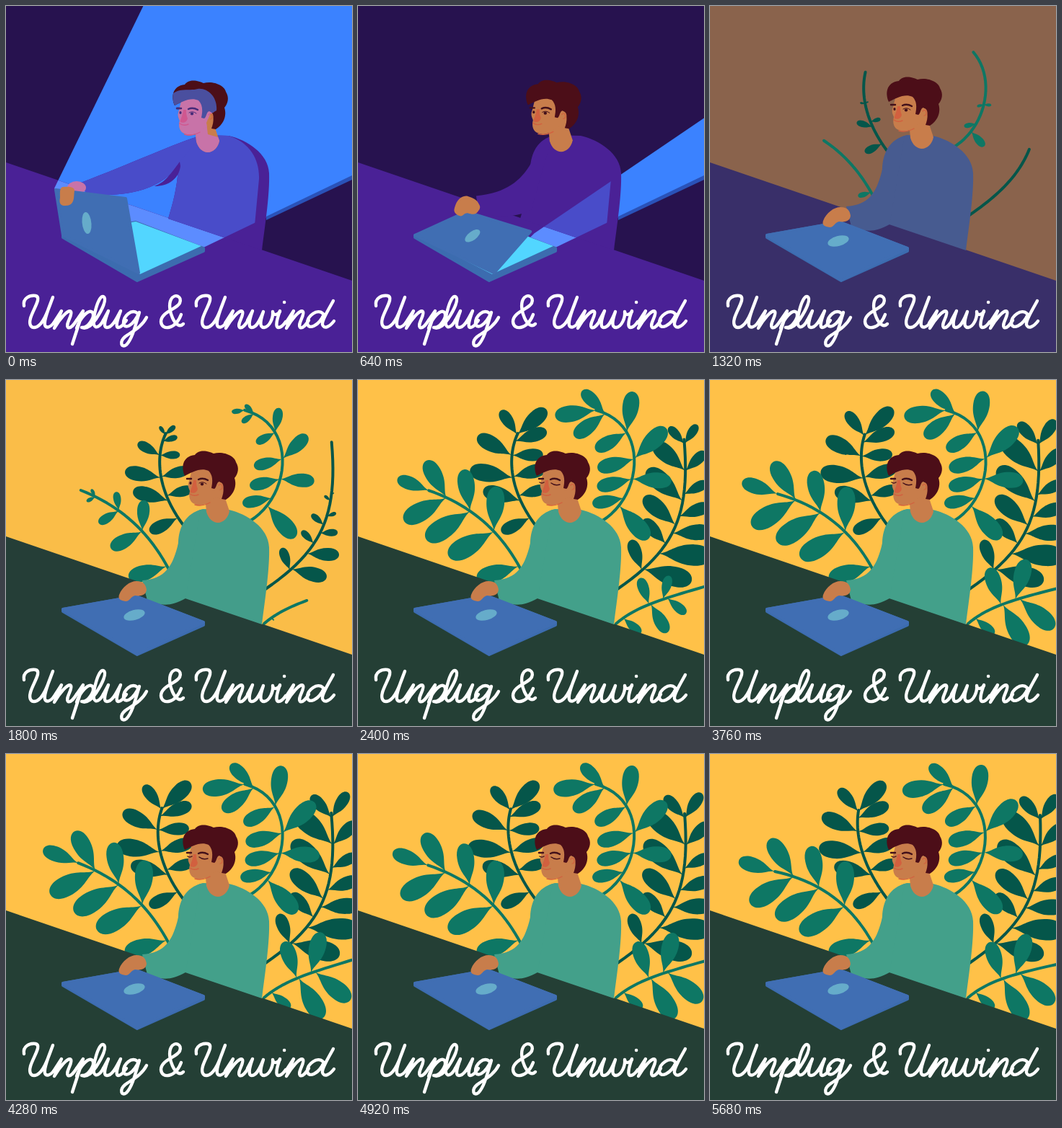
Recreate the animation shown at these times as an HTML page. Size 480 by 480 pixels, loop 5760 ms.

```html
<!DOCTYPE html>
<html lang="en">
<head>
<meta charset="utf-8">
<title>Unplug &amp; Unwind</title>
<style>
html, body { margin: 0; width: 100%; height: 100%; overflow: hidden; }
svg { display: block; width: 100%; height: 100%; }
.line { fill: none; stroke-linecap: round; stroke-linejoin: round; }
</style>
</head>
<body>
<svg id="stage" viewBox="0 0 480 480" xmlns="http://www.w3.org/2000/svg"></svg>
<script>
const LOOP = 5760;
const stage = document.getElementById('stage');
const TORSO = 'M273 179C248 185 240 205 239 225C237 255 231 275 225 295L355 339C360 300 366 260 365 232C364 205 335 186 309 180Z';
const TABLE = 'M0 217L480 381V480H0Z';

const head = (skin, hair, blush, ink) => `
  <path fill="${skin}" d="M276 160L278 183C284 204 306 202 310 182L302 158Z"/>
  <path fill="${skin}" d="M258 124L254 140C251 147 254 151 255 154C253 162 255 170 262 172C270 176 280 172 287 165L303 160V140L290 120Z"/>
  <path fill="${blush}" d="M260 139C259 148 255 153 256 156C260 158 265 156 266 151C264 147 264 142 264 139Z"/>
  <path class="line" stroke="${blush}" stroke-width="1.4" d="M255 158Q260 162 267 159M262 173Q272 176 283 170"/>
  <path fill="${hair}" d="M248 133C243 122 244 106 262 104C268 95 282 99 288 102C302 98 318 106 319 114C324 122 322 130 317 136C321 148 315 160 305 166L299 165C303 155 303 144 296 141C292 141 292 150 289 151L285 150C287 140 287 132 281 126C270 121 258 128 248 133Z"/>
  <ellipse cx="297" cy="148" rx="4.5" ry="6" fill="${skin}"/>
  <path class="line" stroke="${blush}" stroke-width="1.2" d="M295 146Q299 142 300 148Q300 152 297 152"/>
  <path class="line" stroke="${ink}" stroke-width="2.4" d="M251 137L257 137M267 138Q273 135 280 139"/>
  <g class="open" fill="${ink}"><ellipse cx="256" cy="143" rx="1.6" ry="2"/><ellipse cx="272" cy="144.5" rx="2.2" ry="2"/>
    <path class="line" stroke="${ink}" d="M268 143Q273 140 278 144"/></g>
  <path class="line shut" stroke="${ink}" stroke-width="1.5" d="M252 142Q255 144 258 142M268 143Q273 147 280 145"/>`;

const U = 'M25 416C23 405 33 401 41 402C50 404 38 420 34 433C31 444 36 448 43 445C53 440 59 420 65 404C59 420 52 436 54 443C56 448 62 445 66 440';
const N = 'M66 440L77 423L67 447C74 435 86 420 90 424C93 428 82 441 86 446C90 448 94 442 98 436';
const glyph = (d, dx = 0) => `<path d="${d}" transform="translate(${dx})"/>`;
const lettering = [
  glyph(U), glyph(N),
  glyph('M98 436L107 423L92 469M98 447C102 434 114 420 120 425C124 431 114 447 105 446C113 449 121 441 125 434'),
  glyph('M125 434C133 422 141 406 135 403C128 401 120 433 122 442C124 449 131 444 135 436'),
  glyph('M135 436L142 423C138 434 134 446 140 446C148 446 154 432 159 423C155 434 151 446 156 446C161 446 164 440 167 436'),
  glyph('M182 426C174 420 163 430 163 440C164 449 176 445 185 425C179 445 175 462 167 470C160 475 157 466 165 459C174 452 188 446 195 432'),
  glyph('M246 441C236 452 222 420 229 407C234 398 245 403 241 412C237 421 215 424 215 438C216 451 235 449 243 428'),
  glyph(U, 239), glyph(N, 238),
  glyph('M335 436L342 423C338 434 335 446 341 446C348 446 353 434 357 424C353 436 351 446 358 446C366 445 371 432 370 424C371 430 376 429 380 424'),
  glyph('M380 423C376 434 373 446 378 446C383 446 386 441 388 438M386 411L386.2 411'),
  glyph(N, 322),
  glyph('M440 427C432 419 418 430 418 440C419 450 434 444 441 428M454 409C446 424 438 436 439 442C441 449 449 445 455 437')
].join('');

stage.innerHTML = `
  <defs>
    <clipPath id="inBeam"><path id="beamClip"/></clipPath>
    <clipPath id="bodyFront"><path d="M0 0H300L309 180C340 190 352 215 351 240L345 304L300 330L0 480Z"/></clipPath>
    <clipPath id="headFront"><path d="M236 130C246 104 268 114 280 110C294 108 308 122 306 140L297 145L292 157L294 173L322 181V200H262L238 150Z"/></clipPath>
  </defs>
  <rect id="wall" width="480" height="480"/>
  <g id="glow"><path id="beam" fill="#3b82ff"/><path fill="#2a52b8" d="M361 292L480 235V241L361 297Z"/></g>
  <g id="plants"></g>
  <path id="table" d="${TABLE}"/>
  <path class="lit" clip-path="url(#inBeam)" fill="#5c8cff" d="${TABLE}"/>
  <path id="torso" d="${TORSO}"/><path id="arm"/>
  <g class="lit" clip-path="url(#inBeam)"><g clip-path="url(#bodyFront)" fill="#494cc9"><path d="${TORSO}"/><path id="armLit"/></g></g>
  <path id="armpit" fill="#4a2197" d="M241 216C225 238 220 244 206 250C225 250 240 240 242 222Z"/>
  <g class="head">${head('#c87d4b', '#4c0e18', '#d2603f', '#42101a')}</g>
  <g class="lit" clip-path="url(#inBeam)"><g class="head"><g clip-path="url(#headFront)">${head('#c873a8', '#4a4f9f', '#d0578f', '#452a78')}</g></g></g>
  <path fill="#3c6caf" stroke="#3c6caf" stroke-width="4" stroke-linejoin="round" d="M79 318L180 300L274 336V340L182 381L79 321Z"/>
  <path class="lit" fill="#52d6ff" d="M80 318L180 299L271 333L186 372Z"/>
  <ellipse id="palm" cx="98" cy="252" rx="13" ry="9"/>
  <path id="lid" fill="#406eb3" stroke="#406eb3" stroke-width="4" stroke-linejoin="round"/>
  <circle id="badge" r="1" fill="#66acca"/>
  <path id="hand" fill="#c87d4b"/>
  <g class="line" stroke="#fff" stroke-width="4.4" role="img" aria-label="Unplug &amp; Unwind">${lettering}</g>`;

const $ = id => document.getElementById(id);
const all = (css, fn) => stage.querySelectorAll(css).forEach(fn);
const clamp = x => Math.min(1, Math.max(0, x));
const lerp = (a, b, k) => a + (b - a) * k;
const span = (t, from, to) => clamp((t - from) / (to - from));
const smooth = x => x * x * (3 - 2 * x);
const easeOut = x => 1 - (1 - x) ** 2;
const quart = x => x < .5 ? 8 * x ** 4 : 1 - 8 * (1 - x) ** 4;

// Blend the numbers of two strings with the same structure
const NUMBER = /-?\d+(\.\d+)?/g;
const blend = (a, b, k) => {
  const ends = b.match(NUMBER);
  let i = 0;
  return a.replace(NUMBER, v => lerp(+v, +ends[i++], k).toFixed(2));
};
const pose = ([open, half, shut], p) =>
  p < .7 ? blend(open, half, p / .7) : blend(half, shut, (p - .7) / .3);
const keyed = (t, keys) => {
  const i = keys.findIndex(k => k[0] > t);
  if (i < 0) return keys.at(-1)[1];
  if (!i) return keys[0][1];
  const [a, b] = [keys[i - 1], keys[i]];
  return lerp(a[1], b[1], smooth(span(t, a[0], b[0])));
};

const ARM = [
  'M270 180C240 188 170 220 104 245L112 262C150 264 215 262 241 217Z',
  'M270 180C240 188 250 255 163 263L167 288C190 292 222 293 240 282Z',
  'M270 180C225 195 255 275 189 278L196 306C215 314 230 314 249 303Z'
];
const HAND = [
  'M75 266C75 258 74 252 79 251C88 250 95 251 95 256C94 262 95 270 91 274C88 277 84 277 80 277C74 276 74 271 75 266Z',
  'M133 280C136 268 142 263 150 263C160 266 168 270 167 279C166 290 158 289 152 287C147 286 146 290 142 291C136 290 131 286 133 280Z',
  'M157 298C161 287 172 279 181 279C191 279 194 284 195 291C194 300 184 300 179 299C173 300 172 307 166 307C159 306 155 304 157 298Z'
];
// Corners: far left, far right, hinge right, hinge left
const LID = ['M69 255L166 267L184 370L79 318Z', 'M149 285L238 312L189 370L79 318Z', 'M181 300L274 336L182 380L79 318Z'];

// Stem: cubic curve. Leaves: [place on stem, tip x, tip y]
const breeze = t => 1 - Math.cos((t - 3240) / 2440 * 2 * Math.PI);
const DARK = '#05564a', MID = '#0e7764';
const PLANTS = [
  { color: DARK, delay: -150, grown: 1900,
    stem: [[245, 200], [208, 150], [204, 105], [213, 76]],
    leaves: [[.06, 199, 211], [.22, 173, 154], [.27, 260, 150], [.45, 153, 128], [.46, 258, 122],
      [.7, 160, 82], [.7, 252, 103], [.88, 254, 70], [.98, 187, 45], [.98, 251, 39]],
    sway: t => keyed(t, [[2400, 4], [3240, 0], [4280, 1.6], [5680, -3.2]]) },
  { color: DARK, delay: 150, grown: 1900,
    stem: [[360, 290], [440, 235], [462, 190], [458, 85]],
    leaves: [[.16, 379, 222], [.17, 463, 279], [.3, 491, 245], [.38, 397, 194], [.46, 492, 212], [.52, 398, 162],
      [.58, 491, 176], [.68, 401, 122], [.72, 490, 143], [.85, 408, 82], [.85, 491, 98], [.98, 431, 60], [.98, 482, 57]],
    sway: t => -breeze(t) },
  { color: MID, delay: 0, grown: 1950,
    stem: [[232, 275], [205, 218], [160, 178], [90, 163]],
    leaves: [[.1, 165, 276], [.43, 125, 248], [.43, 188, 149], [.67, 92, 228], [.67, 140, 128], [.87, 56, 208], [.87, 83, 118], [1, 40, 148]],
    sway: t => 2.6 * breeze(t) },
  { color: MID, delay: -150, grown: 1950,
    stem: [[330, 200], [395, 170], [405, 60], [325, 42]],
    leaves: [[.2, 403, 220], [.26, 325, 172], [.4, 434, 139], [.4, 331, 149], [.54, 425, 65], [.54, 331, 123],
      [.74, 377, 15], [.74, 327, 97], [.94, 305, 15], [.94, 296, 80], [1, 267, 52]],
    sway: t => 1.2 * breeze(t) },
  { color: MID, delay: 550, grown: 2450,
    stem: [[358, 338], [385, 315], [420, 305], [490, 290]],
    leaves: [[.12, 394, 353], [.47, 388, 261], [.49, 438, 369], [.62, 440, 250], [.66, 477, 346], [1, 530, 285]],
    sway: t => -1.5 * breeze(t) }
];

function stemPoint(stem, u) {
  const v = 1 - u;
  const w = [v ** 3, 3 * v * v * u, 3 * v * u * u, u ** 3];
  return [0, 1].map(axis => stem.reduce((sum, p, i) => sum + p[axis] * w[i], 0));
}

// The stem bends more towards its tip
function bent([x, y], [x0, y0], degrees) {
  const a = degrees * Math.PI / 180, c = Math.cos(a), s = Math.sin(a);
  x -= x0; y -= y0;
  return [x0 + x * c - y * s, y0 + x * s + y * c];
}

const leafShape = ([x, y], angle, size) => size < .5 ? '' :
  `<path transform="translate(${x} ${y})rotate(${angle})scale(${size})" d="M0 0C.2-.02 .32-.2 .67-.2C.9-.2 1-.1 1 0C1 .1 .9 .2 .67 .2C.32 .2 .2 .02 0 0Z"/>`;

function plant({ color, delay, grown, stem, leaves, sway }, t) {
  const reach = easeOut(span(t, 900 + delay, grown + Math.min(0, delay)));
  if (!reach) return '';
  const bend = sway(t);
  const at = u => bent(stemPoint(stem, u), stem[0], bend * u);
  const points = Array.from({ length: 25 }, (_, i) => at(reach * i / 24));
  const shapes = leaves.filter(([u]) => u <= reach).map(([u, x, y]) => {
    const size = easeOut(span(t - delay - 700 * u, 1100, 2000));
    const [nx, ny] = stemPoint(stem, u);
    const angle = Math.atan2(y - ny, x - nx) * 180 / Math.PI + bend * u;
    return leafShape(at(u), angle, size * Math.hypot(x - nx, y - ny));
  });
  return `<g fill="${color}"><polyline class="line" stroke="${color}" stroke-width="4" points="${points.join(' ')}" style="fill:none"/>${shapes.join('')}</g>`;
}

function render(t) {
  const p = quart(span(t, 190, 990));
  const day = smooth(span(t, 800, 1900));
  const set = (id, name, value) => $(id).setAttribute(name, value);

  set('wall', 'fill', blend('rgb(39,18,79)', 'rgb(255,193,72)', day));
  set('table', 'fill', blend('rgb(74,33,150)', 'rgb(36,63,53)', day));
  const shirt = blend('rgb(74,33,150)', 'rgb(67,160,138)', day);
  set('torso', 'fill', shirt);
  set('arm', 'fill', shirt);

  const along = Math.min(1, p / .7);
  const ox = lerp(lerp(67, 180, p), lerp(167, 276, p), along);
  const oy = lerp(lerp(253, 298, p), lerp(265, 336, p), along);
  const angle = Math.max(25.6, 64 - 42 * p) * Math.PI / 180;
  const beam = `M${ox} ${oy}L${ox + 900 * Math.cos(angle)} ${oy - 900 * Math.sin(angle)}L1274 -145L274 335L187 373Z`;
  set('beam', 'd', beam);
  set('beamClip', 'd', beam);
  const light = p < .985 ? 'inline' : 'none';
  set('glow', 'display', light);
  all('.lit', el => el.setAttribute('display', light));

  const arm = pose(ARM, p);
  set('arm', 'd', arm);
  set('armLit', 'd', arm);
  set('armpit', 'opacity', clamp(1 - 2 * p));
  set('hand', 'd', pose(HAND, p));
  set('palm', 'transform', `translate(${82 * p} ${38 * p})`);
  set('palm', 'fill', blend('rgb(200,115,168)', 'rgb(200,125,75)', along));
  set('lid', 'd', pose(LID, p));
  set('badge', 'transform', blend('matrix(6.5 1 -1 -15 112 301)', 'matrix(1.8 6.8 14.5 -3.9 178 326)', p));

  const lift = smooth(span(t, 450, 1300));
  all('.head', el => el.setAttribute('transform', `translate(${-14 * (1 - lift)} ${5 * (1 - lift)})`));
  const awake = t < 2120;
  all('.open', el => el.setAttribute('display', awake ? 'inline' : 'none'));
  all('.shut', el => el.setAttribute('display', awake ? 'none' : 'inline'));

  $('plants').innerHTML = PLANTS.map(kind => plant(kind, t)).join('');
}

const start = performance.now();
function tick() {
  render((performance.now() - start) % LOOP);
  requestAnimationFrame(tick);
}
tick();
</script>
</body>
</html>
```
